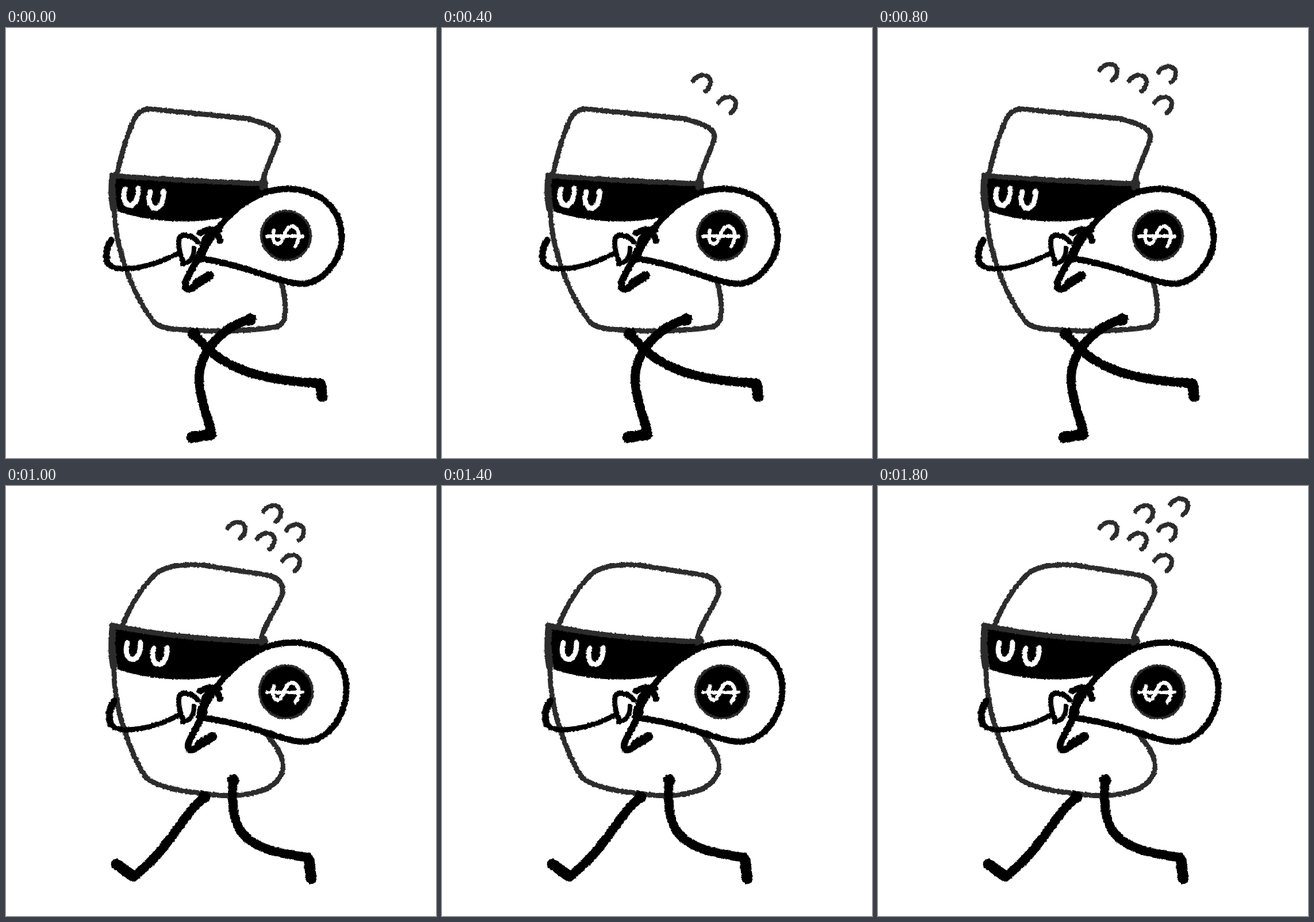
An HTML page that plays this animation: 748 px wide and 748 px high, repeating every 2 s.

```html
<!DOCTYPE html>
<html lang="en">
<head>
<meta charset="utf-8">
<title>Running bandit</title>
<style>
  html, body { margin: 0; width: 100%; height: 100%; overflow: hidden; background: #fff; }
  svg { display: block; width: 100vw; height: 100vh; }
  path { stroke-linecap: round; stroke-linejoin: round; }
</style>
</head>
<body>
<svg id="stage" viewBox="0 0 748 748">
  <filter id="crayon" filterUnits="userSpaceOnUse" x="0" y="0" width="748" height="748" color-interpolation-filters="sRGB">
    <feTurbulence type="fractalNoise" baseFrequency=".25" numOctaves="2" seed="4"/>
    <feDisplacementMap in="SourceGraphic" scale="4" xChannelSelector="R" yChannelSelector="G"/>
    <feGaussianBlur stdDeviation=".7"/>
  </filter>
</svg>
<script>
const INK = '#000', GREY = '#2c2c2c', WHITE = '#fff';
const STEP = 200, STEPS = 10, MARKS = 6, BLANK_STEP = 7;

const line = (d, width, color = INK, fill = 'none') =>
  `<path d="${d}" stroke="${color}" stroke-width="${width}" fill="${fill}"/>`;
const at = (x, y, content) => `<g transform="translate(${x} ${y})">${content}</g>`;

const eye = line('M-10 -15C-20 20 14 26 13 -16', 9, WHITE);

const dollar =
  line('M-33 1H29', 6, WHITE) +
  line('M-21 -9C-27 12 -14 20 -8 10C-2 -2 2 -16 10 -16C24 -14 26 4 16 19', 6.5, WHITE);

const leftArm =
  line('M183 369Q170 390 177 409', 12) +
  line('M177 409C190 430 260 415 300 391', 9);

const rightArm =
  line('M340 388L313 440Q308 458 323 453L338 442', 12) +
  line('M332 444L354 431', 16);

const knot =
  line('M310 410L304 396C296 365 302 358 315 361Q328 363 334 373', 9, INK, WHITE) +
  line('M307 411Q328 406 327 382', 8) +
  line('M338 401Q344 375 356 354', 15) +
  line('M337 357Q355 347 371 352', 11) +
  line('M357 353Q372 360 372 370', 11);

const mark = line('M-16 -4C-9 -17 14 -18 14 -2Q14 8 5 14', 8, GREY);

function strap(top) {
  const edge = `M187 ${top}Q290 265 448 271`;
  return line(`${edge}L440 315Q310 356 194 319Z`, 0, 'none', INK) +
    line(edge, 9, GREY) +
    line(`M186 ${top}Q182 285 187 314`, 12, GREY) +
    line('M448 268v8', 15, GREY);
}

// A leg starts with a heavier hip and ends in a shoe.
const leg = ({ limb, shoe }) =>
  line(limb, 16) + line(limb.split('C')[0] + 'h.1', 21) + line(shoe, 19);

const figure = ({ body, strapTop, eyes, bag, coinY, coinR, shift, legs }) =>
  line(body, 9, GREY) +
  strap(strapTop) +
  eyes.map(([x, y]) => at(x, y, eye)).join('') +
  at(shift, shift, leftArm) +
  line(bag, 11, INK, WHITE) +
  at(487, coinY, `<circle r="${coinR}" fill="${INK}" stroke="${GREY}" stroke-width="4"/>` + dollar) +
  knot +
  at(shift, shift, rightArm) +
  legs.map(leg).join('');

const crossed = figure({
  body: 'M447 265C455 235 470 210 474 190C476 172 440 162 415 157L262 142C236 138 228 147 220 165C180 265 182 335 204 405C220 455 240 490 258 512C270 526 310 525 350 527Q420 528 470 520C492 515 488 475 478 440',
  strapTop: 257,
  eyes: [[217, 295], [261, 300]],
  bag: 'M338 401C360 350 400 305 450 286C510 268 580 290 584 360C586 400 555 440 520 445C480 447 420 412 338 401',
  coinY: 361, coinR: 43, shift: 0,
  legs: [
    { limb: 'M425 507C385 516 340 555 336 605C335 640 352 680 358 706', shoe: 'M357 707L323 712' },
    { limb: 'M327 532C370 585 420 612 547 618', shoe: 'M547 620L550 641' },
  ],
});

const stretched = figure({
  body: 'M445 262C452 235 472 212 480 190C484 170 476 160 455 155L345 138C295 134 270 142 255 158Q222 194 205 237C180 300 188 350 195 385C205 430 225 480 242 505C258 526 320 533 370 538Q420 541 455 526C500 500 480 460 452 432',
  strapTop: 243,
  eyes: [[221, 288], [267, 297]],
  bag: 'M338 403C360 345 400 305 450 281C515 258 590 280 592 350C593 400 560 445 517 445C475 443 430 413 338 403',
  coinY: 358, coinR: 46, shift: 5,
  legs: [
    { limb: 'M345 541C300 580 290 625 222 680', shoe: 'M220 678L192 658' },
    { limb: 'M395 512C390 595 402 632 525 646', shoe: 'M527 650L531 683' },
  ],
});

const markSpots = [[497, 134], [453, 96], [504, 81], [402, 77], [464, 48], [525, 36]];

const stage = document.getElementById('stage');
stage.insertAdjacentHTML('beforeend', `<g filter="url(#crayon)">
  <g class="pose">${crossed}</g>
  <g class="pose">${stretched}</g>
  <g id="marks">${markSpots.map(([x, y]) => at(x, y, mark)).join('')}</g>
</g>`);
const poseNodes = stage.querySelectorAll('.pose');
const markNodes = [...document.getElementById('marks').children];
const show = (node, on) => node.style.display = on ? '' : 'none';

// Marks appear one per step, blink off once, then stay until the loop restarts.
const markCount = step => step === BLANK_STEP ? 0 : Math.min(step, MARKS);

let shown = -1;
function draw() {
  const step = Math.floor(performance.now() / STEP) % STEPS;
  if (step !== shown) {
    shown = step;
    poseNodes.forEach((node, i) => show(node, i === step % 2));
    markNodes.forEach((node, i) => show(node, i < markCount(step)));
  }
  requestAnimationFrame(draw);
}
draw();
</script>
</body>
</html>
```
